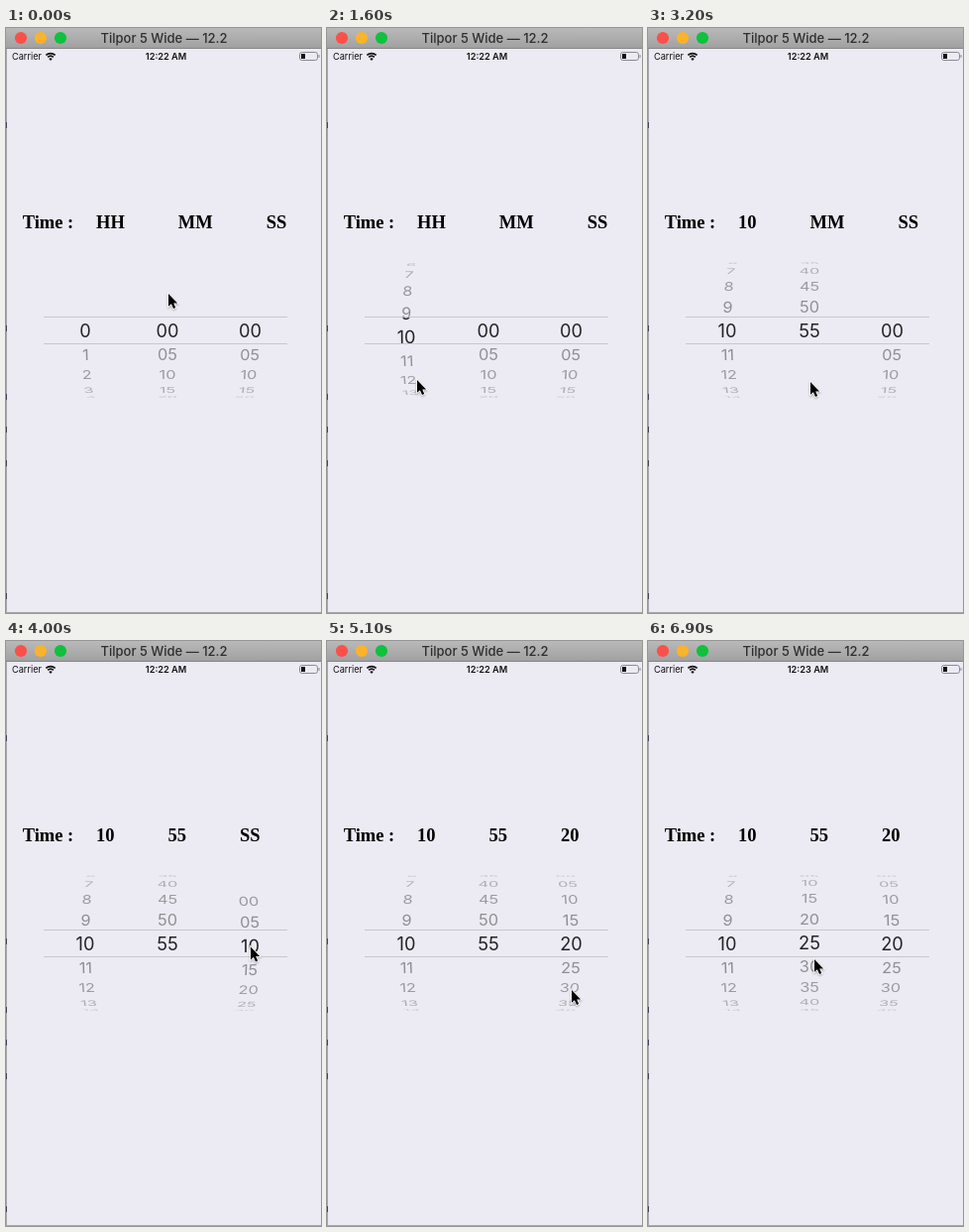
An HTML page with a canvas for the animation above (7 s loop, 318 by 590 pixels).

```html
<!DOCTYPE html>
<html lang="en">
<head>
<meta charset="utf-8">
<title>Time picker</title>
<style>
html, body { margin: 0; width: 100%; height: 100%; overflow: hidden; background: #eceaf2; }
canvas { display: block; }
</style>
</head>
<body>
<canvas id="stage" width="318" height="590"></canvas>
<script>
const ctx = document.getElementById('stage').getContext('2d');
const SANS = 'Inter, "Liberation Sans", sans-serif';
const SERIF = '"Liberation Serif", "Times New Roman", serif';
const LOOP = 7000, STEP = 100;
const MID = 305, RADIUS = 68, ANGLE = 0.36;

const hours = n => String(n);
const fives = n => String(n * 5).padStart(2, '0');

// Each spin turns a wheel by some rows; the label takes the value at `set`.
const wheels = [
  { x: 80, lean: 1, count: 24, name: hours, label: 'HH', set: 1950,
    spins: [{ from: 800, to: 1950, rows: 10 }] },
  { x: 163, lean: 0, count: 12, name: fives, label: 'MM', set: 3250,
    spins: [{ from: 2450, to: 3200, rows: 11 }, { from: 6050, to: 7100, rows: -6 }] },
  { x: 246.5, lean: -1, count: 12, name: fives, label: 'SS', set: 5060,
    spins: [{ from: 3950, to: 4450, rows: 7 }, { from: 4480, to: 5060, rows: -3 }] }
];

// The pointer glides from place to place and flicks upward to start a spin.
const home = { x: 164, y: 268 };
const glides = [
  { from: 100, to: 1000, x: 91, y: 355 },
  { from: 1700, to: 2300, x: 164, y: 333 },
  { from: 2500, to: 3000, x: 164, y: 357 },
  { from: 3500, to: 3900, x: 247, y: 335 },
  { from: 4600, to: 4900, x: 247, y: 352 },
  { from: 5600, to: 5950, x: 168, y: 292 },
  { from: 6050, to: 6400, x: 168, y: 321 }
];

const progress = (t, { from, to }) => Math.min(1, Math.max(0, (t - from) / (to - from)));
const easeOut = k => 1 - (1 - k) ** 3;
const smooth = k => k * k * (3 - 2 * k);

function wheelPos(wheel, t) {
  return wheel.spins.reduce((sum, s) => sum + s.rows * easeOut(progress(t, s)), 0);
}

function pointerPos(t) {
  let { x, y } = home;
  for (const g of glides) {
    const k = smooth(progress(t, g));
    x += (g.x - x) * k;
    y += (g.y - y) * k;
  }
  for (const s of wheels.flatMap(w => w.spins)) {
    if (s.rows > 0) y -= 45 * Math.sin(Math.PI * Math.min(1, 2 * progress(t, s)));
  }
  return [x, y];
}

function text(str, x, y, font, color, align = 'left') {
  ctx.font = font;
  ctx.fillStyle = color;
  ctx.textAlign = align;
  ctx.fillText(str, x, y);
}

function rect(color, x, y, w, h) {
  ctx.fillStyle = color;
  ctx.fillRect(x, y, w, h);
}

function disc(color, x, y, r) {
  ctx.fillStyle = color;
  ctx.beginPath();
  ctx.arc(x, y, r, 0, 7);
  ctx.fill();
}

function drawWindow() {
  rect('#eceaf2', 0, 0, 318, 590);
  const bar = ctx.createLinearGradient(0, 0, 0, 20);
  bar.addColorStop(0, '#b9b9b9');
  bar.addColorStop(1, '#a1a1a1');
  rect(bar, 0, 0, 318, 20);
  rect('#858585', 0, 20, 318, 1);
  rect('#a9a8ad', 0, 21, 1, 569);
  rect('#a9a8ad', 0, 589, 318, 1);
  for (const y of [95, 300, 369, 402, 436, 570]) rect('#43485a', 0, y, 1, 6);
  ['#fb5049', '#fbb32a', '#0fc13c'].forEach((color, i) => disc(color, 15 + 20 * i, 10, 6.1));
  text('Tilpor 5 Wide — 12.2', 159.5, 14.8, '500 13px ' + SANS, '#2e2e2e', 'center');
}

function drawStatus(t) {
  text('Carrier', 6, 32.3, '9.2px ' + SANS, '#111');
  text(t < 5300 ? '12:22 AM' : '12:23 AM', 161.5, 32.3, '600 9.2px ' + SANS, '#111', 'center');

  ctx.strokeStyle = '#111';
  ctx.lineWidth = 1.6;
  for (const r of [7, 4.3]) {
    ctx.beginPath();
    ctx.arc(45, 32.6, r, -2.3, -0.84);
    ctx.stroke();
  }
  ctx.fillStyle = '#111';
  ctx.beginPath();
  ctx.moveTo(45, 33);
  ctx.arc(45, 33, 2.6, -2.3, -0.84);
  ctx.fill();

  ctx.strokeStyle = '#8b8a90';
  ctx.lineWidth = 1;
  ctx.beginPath();
  ctx.roundRect(296.5, 24.5, 18, 8, 2.2);
  ctx.stroke();
  rect('#111', 298, 26, 4, 5);
  rect('#8b8a90', 315.5, 27, 1, 3);
}

function drawLabels(t) {
  const font = 'bold 18.5px ' + SERIF;
  text('Time :', 16.7, 202, font, '#000');
  let x = 91;
  for (const w of wheels) {
    const label = t < w.set ? w.label : w.name(Math.round(wheelPos(w, w.set)));
    text(label, x, 202, font, '#000');
    x += ctx.measureText(label).width + 54;
  }
}

function drawRows(wheel, pos, size, inner) {
  for (let n = 0; n < wheel.count; n++) {
    const a = (n - pos) * ANGLE;
    if (Math.abs(a) > 1.5) continue;
    const c = Math.cos(a), s = Math.sin(a);
    const x = wheel.x + wheel.lean * 6.5 * (1 - c);
    ctx.save();
    ctx.transform(1, 0, wheel.lean * s * 0.08, c, x, MID + RADIUS * s);
    const color = inner ? '#222225' : `rgba(0,0,0,${0.13 + 0.28 * c})`;
    text(wheel.name(n), 0, size * 0.364, `${size}px ${SANS}`, color, 'center');
    ctx.restore();
  }
}

function clipped(y, h, draw) {
  ctx.save();
  ctx.beginPath();
  ctx.rect(30, y, 260, h);
  ctx.clip();
  draw();
  ctx.restore();
}

function drawPicker(t) {
  for (const wheel of wheels) {
    const pos = wheelPos(wheel, t);
    const outer = () => drawRows(wheel, pos, 16.3, false);
    clipped(230, 62, outer);
    clipped(319, 60, outer);
    clipped(292, 27, () => drawRows(wheel, pos, 18.2, true));
  }
  rect('#c9c8ce', 38, 291, 246, 1);
  rect('#c9c8ce', 38, 318, 246, 1);
}

const arrow = new Path2D('M0 0V14.6L3.3 11.6L5.7 17L8.2 15.9L5.9 10.7H10.4Z');
function drawPointer(t) {
  ctx.save();
  ctx.translate(...pointerPos(t));
  ctx.scale(0.88, 0.88);
  ctx.shadowColor = 'rgba(0,0,0,.3)';
  ctx.shadowBlur = 2;
  ctx.shadowOffsetY = 1;
  ctx.strokeStyle = '#fff';
  ctx.lineWidth = 1.8;
  ctx.stroke(arrow);
  ctx.shadowColor = 'transparent';
  ctx.fillStyle = '#000';
  ctx.fill(arrow);
  ctx.restore();
}

const start = performance.now();
function frame() {
  const elapsed = (performance.now() - start) % LOOP;
  const t = Math.floor(elapsed / STEP) * STEP;
  drawWindow();
  drawStatus(t);
  drawLabels(t);
  drawPicker(t);
  drawPointer(t);
  requestAnimationFrame(frame);
}
frame();
</script>
</body>
</html>
```
